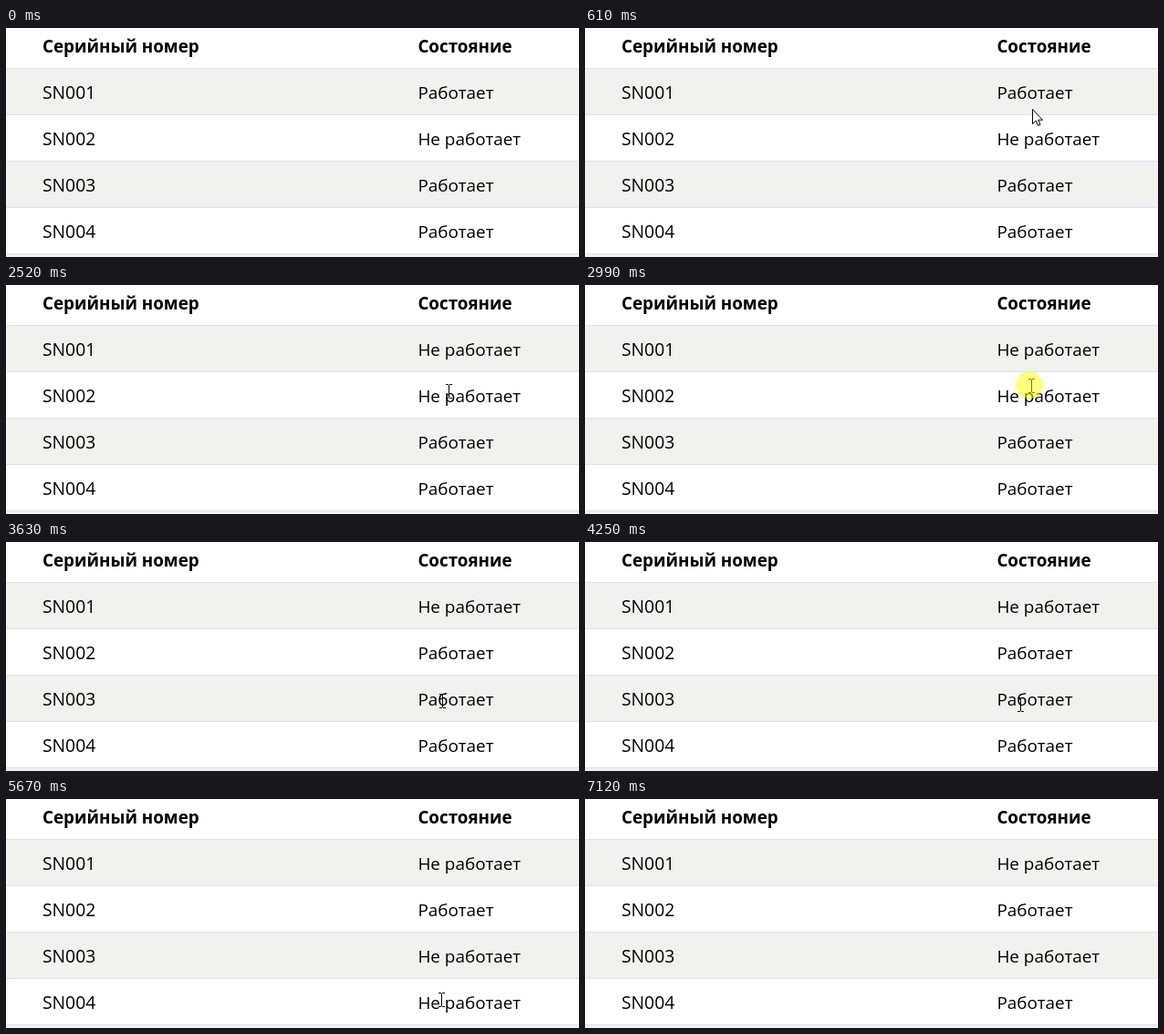
Animation of 628 by 252 pixels, one loop 7.78 s. Source, as an HTML page:

```html
<!DOCTYPE html>
<html lang="ru">
<head>
<meta charset="utf-8">
<style>
  html, body { margin: 0; width: 100%; height: 100%; overflow: hidden; background: #fff; }
  svg { display: block; }
  text { font: 18.9px "Open Sans", "Noto Sans", sans-serif; }
  .serial { font-size: 19.3px; }
  .head { font-size: 18.8px; font-weight: 700; }
</style>
</head>
<body>
<svg width="628" height="252" viewBox="0 0 628 252">
  <g id="table"></g>
  <g id="pointer">
    <path id="arrow" d="M.5 .5V16.5L4.2 13L6.6 18.4L9 17.4L6.7 12.2H11.5Z" fill="#fff" stroke="#000"/>
    <path id="beam" d="M-1 -7h3v1h-3zM3 -7h3v1h-3zM2 -6h1v14h-1zM-1 8h3v1h-3zM3 8h3v1h-3z"/>
    <circle id="ring" r="15" fill="#ff0" opacity=".5"/>
  </g>
</svg>
<script>
const LOOP = 7780, STEP = 70, ROW = 51, LEFT = 40, RIGHT = 451.4;
const SHOW = 120, HIDE = 7120;

const works = [true, false, true, true];
const clicks = [
  { row: 0, down: 1290, up: 1490, flip: 1760 },
  { row: 1, down: 2990, up: 3220, flip: 3220 },
  { row: 2, down: 4050, up: 4250, flip: 4320 },
  { row: 3, down: 5400, up: 5670, flip: 5670 },
  { row: 3, down: 6390, up: 6650, flip: 6650 },
];
// Each move eases from the end of the one before it
const moves = [
  { start: SHOW, steps: 1, x: 550, y: 190 },
  { start: 190, steps: 7, x: 490, y: 89 },
  { start: 680, steps: 4, x: 490, y: 72 },
  { start: 2240, steps: 6, x: 483, y: 117 },
  { start: 2660, steps: 2, x: 487, y: 110 },
  { start: 3490, steps: 4, x: 475, y: 178 },
  { start: 4650, steps: 6, x: 475, y: 220 },
  { start: 6070, steps: 1, x: 480, y: 221 },
  { start: 7050, steps: 1, x: 522, y: 240 },
];

const $ = id => document.getElementById(id);
const show = (id, on) => $(id).setAttribute("visibility", on ? "visible" : "hidden");

function add(name, attrs, content = "") {
  const el = document.createElementNS("http://www.w3.org/2000/svg", name);
  for (const key in attrs) el.setAttribute(key, attrs[key]);
  el.textContent = content;
  return $("table").appendChild(el);
}

for (let i = 0; i < 5; i++) {
  const y = 44 + i * ROW;
  if (i % 2 === 0) add("rect", { y, width: 628, height: ROW, fill: "#f1f1ef" });
  add("rect", { y, width: 628, height: 1, fill: "#dee2e6" });
}
add("text", { x: LEFT, y: 27, class: "head" }, "Серийный номер");
add("text", { x: RIGHT, y: 27, class: "head" }, "Состояние");
const labels = works.map((_, i) => {
  const y = 78 + i * ROW;
  add("text", { x: LEFT, y, class: "serial" }, "SN00" + (i + 1));
  return add("text", { x: RIGHT, y });
});

function pointerAt(t) {
  const i = Math.max(0, moves.findLastIndex(m => m.start <= t));
  const to = moves[i], from = moves[i - 1] || to;
  const step = Math.floor((t - to.start) / STEP) + 1;
  const p = Math.min(1, step / to.steps);
  const ease = 1 - (1 - p) ** 2;
  return ["x", "y"].map(k => Math.round(from[k] + (to[k] - from[k]) * ease));
}

function draw(t) {
  const state = [...works];
  for (const c of clicks) if (t >= c.flip) state[c.row] = !state[c.row];
  labels.forEach((label, i) => label.textContent = state[i] ? "Работает" : "Не работает");

  const [x, y] = pointerAt(t);
  const visible = t >= SHOW && t < HIDE;
  const row = Math.floor((y - 57) / ROW);
  const overText = y - 57 - row * ROW < 27 && x < (state[row] ? 534 : 564);
  $("pointer").setAttribute("transform", `translate(${x} ${y})`);
  show("beam", visible && overText);
  show("arrow", visible && !overText);
  show("ring", clicks.some(c => t >= c.down && t < c.up));
}

const begin = performance.now();
function frame() {
  draw((performance.now() - begin) % LOOP);
  requestAnimationFrame(frame);
}
frame();
</script>
</body>
</html>
```
